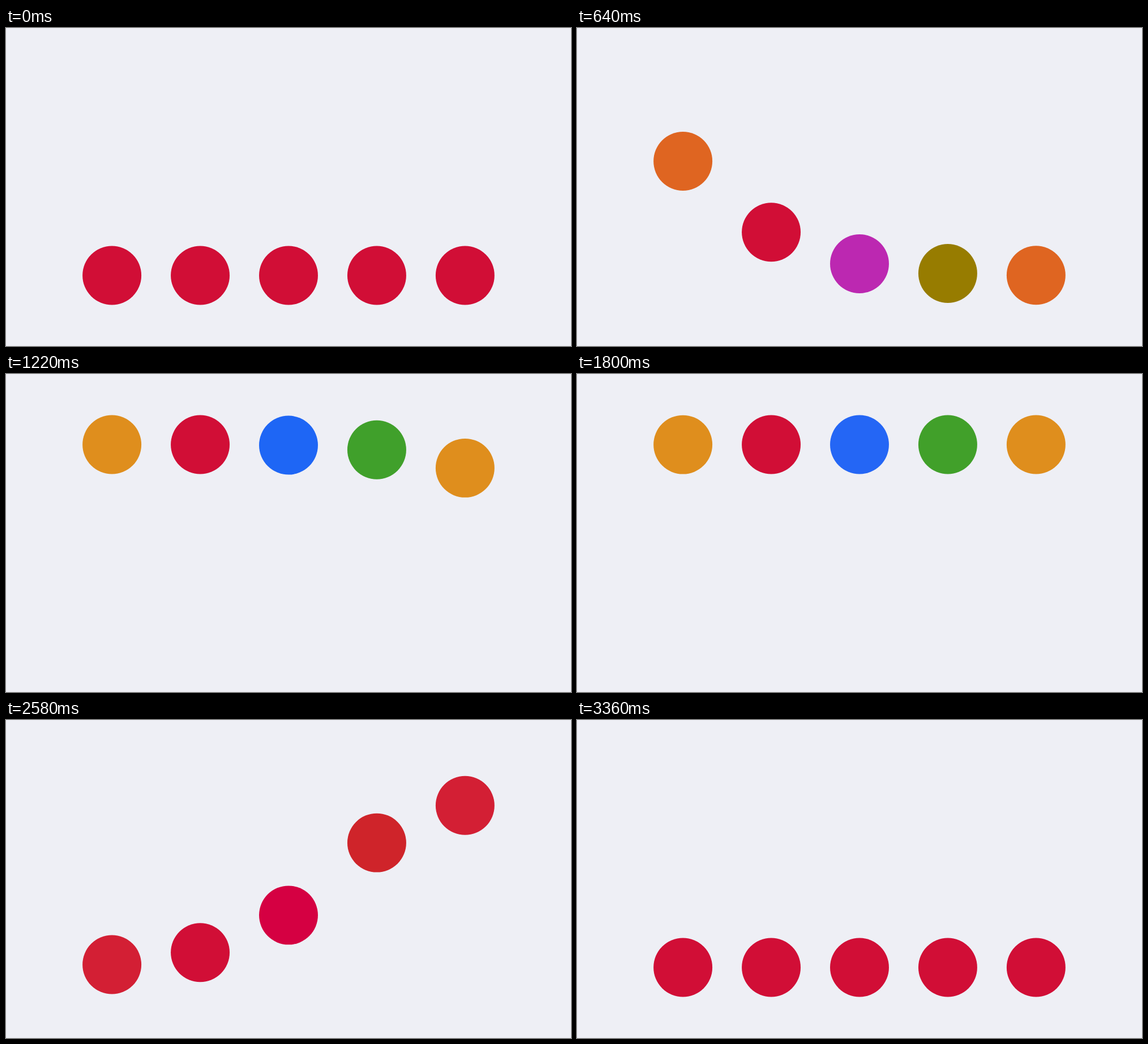
Write an HTML page that moves like this. It is 998 by 561 pixels and loops after 3.4 s.

```html
<!DOCTYPE html>
<html lang="en">
<head>
<meta charset="utf-8">
<title>Five dots</title>
<style>
  html, body { margin: 0; width: 100%; height: 100%; overflow: hidden; background: #eeeff5; }
  svg { display: block; width: 100%; height: 100%; }
</style>
</head>
<body>
<svg id="stage" viewBox="0 0 998 561"></svg>
<script>
const LOOP = 3400, STEP = 20;
const HALF = 1680, MOVE = 1200, STAGGER = 120;
const UNIT = 998 / 1920;
const RED = [209, 14, 54], YELLOW = [223, 142, 29], BLUE = [30, 102, 245], GREEN = [64, 160, 43];
const WHITE = [0.95047, 1, 1.08883];

const clamp = (v, lo = 0, hi = 1) => Math.min(hi, Math.max(lo, v));
const mix = (a, b, p) => a + (b - a) * p;
const easeInOut = (x, n) => x < 0.5 ? Math.pow(2 * x, n) / 2 : 1 - Math.pow(2 - 2 * x, n) / 2;

// Progress of a tween that goes out, then returns after HALF
function swing(t, delay, power) {
  const at = start => easeInOut(clamp((t - start - delay) / MOVE), power);
  return at(0) - at(HALF);
}

function toLch(rgb) {
  const [r, g, b] = rgb.map(v => {
    v /= 255;
    return v <= 0.04045 ? v / 12.92 : Math.pow((v + 0.055) / 1.055, 2.4);
  });
  const [x, y, z] = [
    0.4124564 * r + 0.3575761 * g + 0.1804375 * b,
    0.2126729 * r + 0.7151522 * g + 0.072175 * b,
    0.0193339 * r + 0.119192 * g + 0.9503041 * b
  ].map((v, i) => {
    v /= WHITE[i];
    return v > 0.008856 ? Math.cbrt(v) : 7.787 * v + 16 / 116;
  });
  const a = 500 * (x - y), c = 200 * (y - z);
  return [116 * y - 16, Math.hypot(a, c), Math.atan2(c, a)];
}

function toRgb([l, c, h]) {
  const fy = (l + 16) / 116;
  const [x, y, z] = [fy + c * Math.cos(h) / 500, fy, fy - c * Math.sin(h) / 200]
    .map((f, i) => WHITE[i] * (f > 0.206893 ? f ** 3 : (f - 16 / 116) / 7.787));
  const rgb = [
    3.2404542 * x - 1.5371385 * y - 0.4985314 * z,
    -0.969266 * x + 1.8760108 * y + 0.041556 * z,
    0.0556434 * x - 0.2040259 * y + 1.0572252 * z
  ].map(v => {
    const s = v <= 0.0031308 ? 12.92 * v : 1.055 * Math.pow(v, 1 / 2.4) - 0.055;
    return Math.round(255 * clamp(s));
  });
  return `rgb(${rgb})`;
}

// Blend around the shorter side of the hue wheel
function blend(from, to, p) {
  let turn = to[2] - from[2];
  if (turn > Math.PI) turn -= 2 * Math.PI;
  if (turn < -Math.PI) turn += 2 * Math.PI;
  return toRgb([mix(from[0], to[0], p), mix(from[1], to[1], p), from[2] + turn * p]);
}

const stage = document.getElementById("stage");
const base = toLch(RED);
const dots = [YELLOW, RED, BLUE, GREEN, YELLOW].map((rgb, i) => {
  const el = document.createElementNS("http://www.w3.org/2000/svg", "circle");
  el.setAttribute("cx", 499 + (i - 2) * 300 * UNIT);
  el.setAttribute("r", 100 * UNIT);
  stage.append(el);
  return { el, goal: toLch(rgb) };
});

function draw(t) {
  const tint = swing(t, 0, 3);
  dots.forEach(({ el, goal }, i) => {
    const rise = swing(t, i * STAGGER, 5);
    el.setAttribute("cy", 280.5 + mix(300, -300, rise) * UNIT);
    el.setAttribute("fill", blend(base, goal, tint));
  });
}

const start = performance.now();
function tick() {
  const t = (performance.now() - start + 1) % LOOP;
  draw(Math.floor(t / STEP) * STEP);
  requestAnimationFrame(tick);
}
tick();
</script>
</body>
</html>
```
